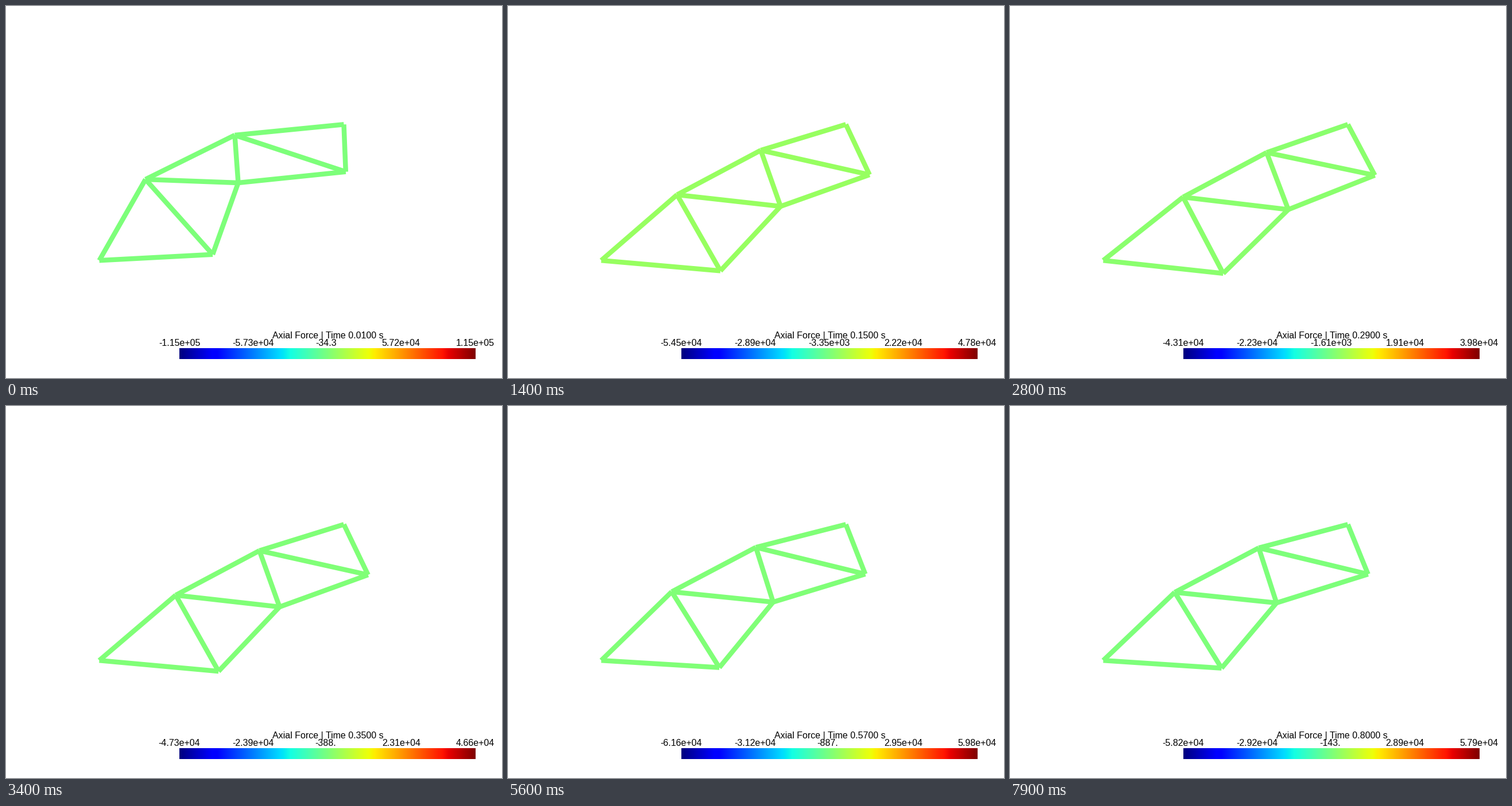
A matplotlib script for the animation above (8 s loop, 864 px wide and 648 px high).

```python
import numpy as np
import matplotlib.pyplot as plt
from matplotlib.animation import FuncAnimation
from matplotlib.collections import LineCollection

W, H = 864, 648
FRAMES, STEP = 80, 0.01

plt.rcParams["font.family"] = "Liberation Sans"
plt.rcParams["font.size"] = 16

# A and G are fixed supports; B to F move between three poses.
A, G = (162.5, 443.2), (588.5, 206.3)
NAMES = "ABCDEFG"
BARS = "AB AC BC CE CD BD ED EF EG DF FG".split()
START = np.array([(360, 432.8), (243, 302), (404.5, 308), (398.5, 225), (591.8, 288.7)])
REST = np.array([(368.5, 456.7), (287, 324.6), (464.3, 343), (433.4, 247.2), (623.7, 293)])
PEAK = np.array([(372, 467.8), (304.5, 334.7), (489, 357), (450, 257), (638, 295.3)])
Q_START, Q_PEAK = -59.8, 24.7


def hermite(u, p0, p1, v0, v1):
    return ((2 * u**3 - 3 * u**2 + 1) * p0 + (u**3 - 2 * u**2 + u) * v0
            + (3 * u**2 - 2 * u**3) * p1 + (u**3 - u**2) * v1)


def sway(t):
    """Damped swing around the rest pose, with a soft start."""
    if t < 0.15:
        span = 0.14
        return hermite((t - 0.01) / span, Q_START, 10.5, 150 * span, 402 * span)
    return 143 * np.exp(-6.7 * t) * np.sin(9.2 * (t - 0.128))


def joints(q):
    """Parabola through the three poses."""
    to_start = q * (q - Q_PEAK) / (Q_START * (Q_START - Q_PEAK))
    to_peak = q * (q - Q_START) / (Q_PEAK * (Q_PEAK - Q_START))
    moving = REST + to_start * (START - REST) + to_peak * (PEAK - REST)
    return dict(zip(NAMES, [A, *moving, G]))


# The force range narrows as the truss sags; its middle drifts with time.
KEY_T = [0.01, 0.15, 0.23, 0.35, 0.43, 0.57, 0.80]
MID = [-34.3, -3350, -2840, -388, -1070, -887, -143]
HALF = np.array([114550, 51150, 38600, 46942, 56130, 60707, 58057])
key_q = np.array([sway(t) for t in KEY_T])
order = np.argsort(key_q)


def force_range(t):
    mid = np.interp(t, KEY_T, MID)
    half = np.interp(sway(t), key_q[order], HALF[order])
    return mid - half, mid + half


fig = plt.figure(figsize=(W / 72, H / 72), dpi=72, facecolor="white")
ax = fig.add_axes([0, 0, 1, 1])
ax.axis("off")

jet = plt.get_cmap("jet", 256)
ax.imshow(np.linspace(0, 1, 256)[None, :], cmap=jet, aspect="auto",
          extent=(302, 818, 615, 596), interpolation="nearest")
ax.set_xlim(0, W)
ax.set_ylim(H, 0)

truss = LineCollection([], linewidths=8.5, capstyle="butt")
ax.add_collection(truss, autolim=False)

ticks = np.linspace(302, 817, 5)
labels = [ax.text(x, 591.7, "", ha="center", va="baseline") for x in ticks]
title = ax.text(561, 578.8, "", ha="center", va="baseline")


def draw(i):
    t = (i + 1) * STEP
    pos = joints(sway(t))
    lo, hi = force_range(t)
    truss.set_segments([[pos[m], pos[n]] for m, n in BARS])
    truss.set_color(jet(-lo / (hi - lo)))
    for label, x, v in zip(labels, ticks, np.linspace(lo, hi, 5)):
        text = f"{v:#.3g}"
        label.set_text(text)
        # Short numbers are padded on the right to six characters.
        label.set_x(x - 2.4 * max(0, 6 - len(text)))
    title.set_text(f"Axial Force | Time {t:.4f} s")
    return [truss, title, *labels]


anim = FuncAnimation(fig, draw, frames=FRAMES, interval=100, repeat=True)
plt.show()
```
